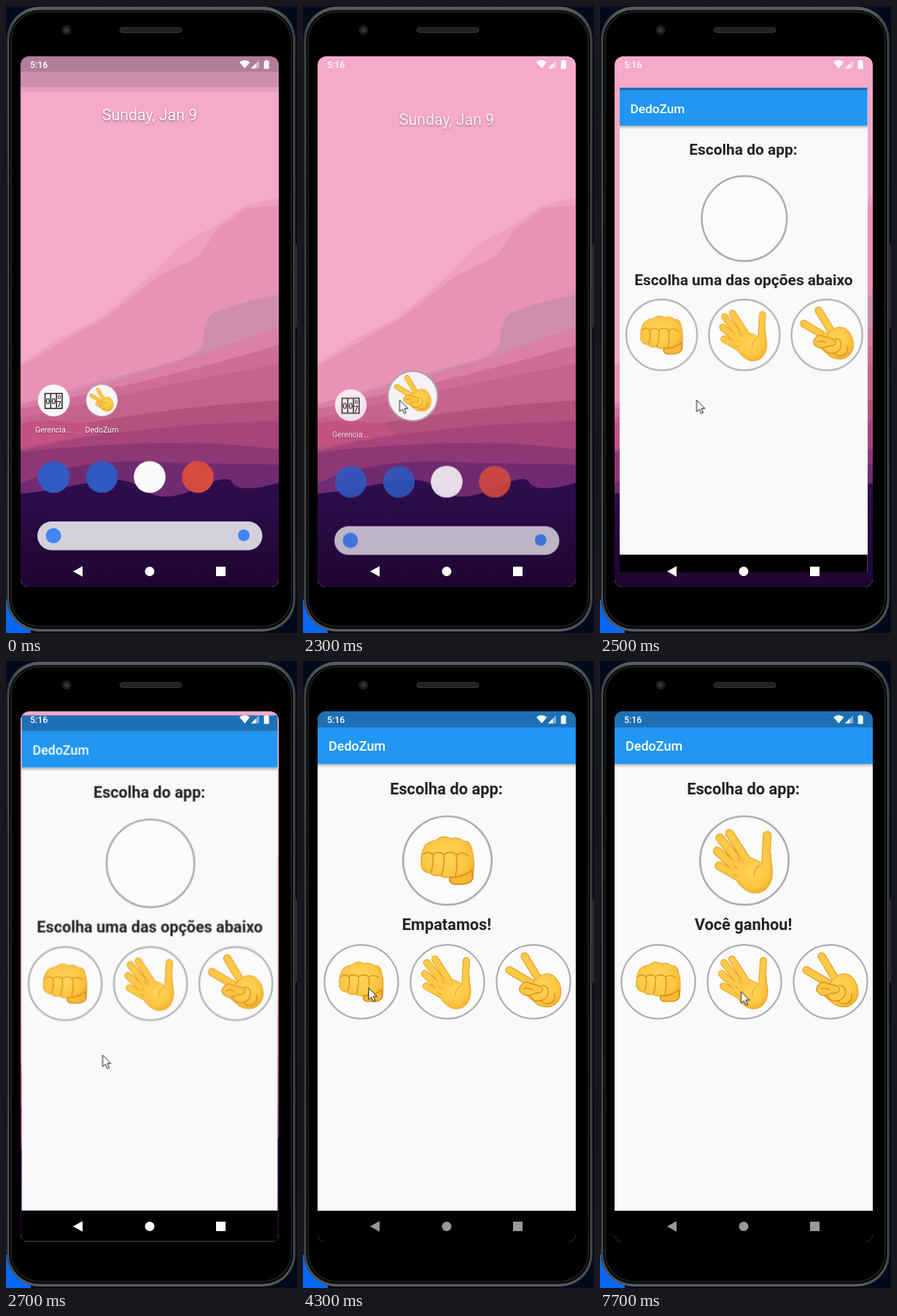
Recreate the animation shown at these times as an HTML page. Size 399x860 px, loop 8000 ms.

```html
<!DOCTYPE html>
<html lang="pt">
<head>
<meta charset="utf-8">
<title>Jogo de mãos</title>
<style>
html, body { margin: 0; width: 100%; height: 100%; overflow: hidden; background: #020a1c; }
svg { position: absolute; display: block; font-family: Roboto, sans-serif; }
.frame { left: 0; top: 0; width: 399px; height: 860px; }
.screen { position: absolute; left: 20px; top: 69px; width: 354px; height: 728px; border-radius: 12px; overflow: hidden; }
.pane { left: 0; top: 0; width: 354px; height: 728px; transform-origin: 0 0; }
.mid { text-anchor: middle; }
.heading { font-size: 21.8px; font-weight: 700; fill: #222; text-anchor: middle; }
.shade { text-shadow: 0 1px 2px rgba(60, 20, 50, .6); }

.icons, .tapped, .scrim, .launch, .app, .ask, .tie, .win, .appRock, .appPaper, .cursor {
  animation: 8s step-end -8ms infinite;
}
.icons { animation-name: icons; }
.scrim, .tapped { animation-name: leave; }
.launch { animation-name: launch; }
.app { animation-name: app; }
.ask { animation-name: ask; }
.tie { animation-name: tie; }
.win { animation-name: win; }
.appRock { animation-name: appRock; }
.appPaper { animation-name: appPaper; }
.cursor { animation-name: cursor; }
.nav { animation: nav 8s linear -8ms infinite; }

@keyframes icons {
  0% { transform: none; opacity: 1; }
  28.75% { transform: translateY(6.5px); opacity: .87; }
  30% { transform: translateY(38px); opacity: .31; }
  31.25%, 100% { transform: translateY(60px); opacity: 0; }
}
@keyframes leave { 0% { opacity: 1; } 28.75%, 100% { opacity: 0; } }
@keyframes launch { 0% { opacity: 0; } 28.75% { opacity: 1; } 30%, 100% { opacity: 0; } }
@keyframes app {
  0% { opacity: 0; transform: none; clip-path: inset(0); }
  30% { opacity: 1; transform: translate(28px, 98.6px) scale(.82); clip-path: inset(88px 0 90px); }
  31.25% { opacity: 1; transform: translate(7px, 26px) scale(.96); clip-path: inset(18px 0 18px); }
  33.75% { opacity: 1; transform: translate(1.6px, 5.6px) scale(.9915); clip-path: inset(0); }
  35%, 100% { opacity: 1; transform: none; clip-path: inset(0); }
}
@keyframes ask { 0% { opacity: 1; } 45%, 100% { opacity: 0; } }
@keyframes tie { 0% { opacity: 0; } 45% { opacity: 1; } 88.75%, 100% { opacity: 0; } }
@keyframes win { 0% { opacity: 0; } 88.75%, 100% { opacity: 1; } }
@keyframes appRock { 0% { opacity: 0; } 45% { opacity: 1; } 76.25%, 100% { opacity: 0; } }
@keyframes appPaper { 0% { opacity: 0; } 76.25%, 100% { opacity: 1; } }
@keyframes nav { 0%, 36% { opacity: 1; } 45% { opacity: .66; } 53.75%, 100% { opacity: .6; } }
@keyframes cursor {
  0% { transform: translate(-40px, -40px); }
  18.75% { transform: translate(26px, 4px); }
  20% { transform: translate(40px, 190px); }
  21.25% { transform: translate(64px, 400px); }
  22.5% { transform: translate(90px, 560px); }
  23.75% { transform: translate(110px, 606px); }
  25% { transform: translate(126px, 570px); }
  26.25% { transform: translate(132.5px, 540.5px); }
  35% { transform: translate(132.5px, 540.5px); animation-timing-function: steps(7, end); }
  43.75% { transform: translate(90px, 448.5px); }
  67.5% { transform: translate(84px, 390px); }
  68.75% { transform: translate(130px, 303px); }
  70% { transform: translate(192px, 466px); }
  71.25% { transform: translate(207.5px, 458px); }
  82.5% { transform: translate(250px, 457px); }
  83.75% { transform: translate(298px, 456px); }
  85% { transform: translate(312.5px, 457px); }
  93.75% { transform: translate(270px, 456px); }
  95% { transform: translate(212px, 454px); }
  96.25%, 100% { transform: translate(193.5px, 453.5px); }
}
</style>
</head>
<body>
<svg class="frame" viewBox="0 0 399 860">
  <defs>
    <linearGradient id="rim" x2="0" y2="1">
      <stop offset="0" stop-color="#5a6062"/><stop offset=".04" stop-color="#33383a"/>
      <stop offset=".5" stop-color="#24282a"/><stop offset=".94" stop-color="#34393b"/><stop offset="1" stop-color="#555b5d"/>
    </linearGradient>
    <radialGradient id="skin" cx=".45" cy=".4" r=".65">
      <stop offset="0" stop-color="#ffd55a"/><stop offset=".65" stop-color="#fdc843"/><stop offset="1" stop-color="#f4ad2c"/>
    </radialGradient>
    <linearGradient id="night" x2="0" y2="1">
      <stop offset="0" stop-color="#300d50"/><stop offset=".5" stop-color="#270a40"/><stop offset="1" stop-color="#1e0630"/>
    </linearGradient>
    <linearGradient id="drop" x2="0" y2="1">
      <stop offset="0" stop-color="#000" stop-opacity=".3"/><stop offset="1" stop-color="#000" stop-opacity="0"/>
    </linearGradient>

    <g id="rock" stroke-linecap="round" stroke-linejoin="round">
      <path d="M-30 6Q-31 -10 -25 -18Q-19 -23 -13 -23Q-5 -30 4 -25Q13 -27 18 -22Q25 -23 27 -16Q31 -4 30 10L29 21Q26 27 17 27H7Q1 25 3 19Q-5 20 -8 17Q-16 19 -20 14Q-28 14 -30 6Z" fill="url(#skin)" stroke="#e59c25"/>
      <path d="M-19 13Q-15 5 -17 -7M-7 17Q-3 6 -4 -7M9 18Q12 6 10 -7M-28 -7Q-23 -12 -17 -7Q-11 -12 -4 -7Q3 -12 10 -7Q18 -11 24 -5" fill="none" stroke="#dc8c1d" stroke-width="1.3"/>
      <path d="M3 19Q17 20 28 11L29 20Q27 27 17 27H7Q1 25 3 19Z" fill="#f9b934" stroke="#d1811a" stroke-width="1.2"/>
    </g>

    <path id="digits" d="M-17 -31L5 3M-28 -26L-2 7M-31 -11L-5 13M-29 6L-3 21M26 -29L24 7"/>
    <g id="paper" fill="none" stroke-linecap="round" stroke-linejoin="round">
      <use href="#digits" stroke="#e59c25" stroke-width="10"/>
      <path d="M-10 17Q-6 2 7 -3Q17 0 20 4Q21 -3 22 -8H30Q30 0 32 10Q33 21 27 30Q21 38 10 37Q2 36 -7 26Z" fill="url(#skin)" stroke="#eaa32a"/>
      <use href="#digits" stroke="#fdc946" stroke-width="8"/>
      <path d="M-5 2L-8 -3M-8 10L-12 6M-8 18L-13 15M18 5Q11 9 11 18" stroke="#e39a25"/>
    </g>

    <path id="vee" d="M-12 -35L8 -2M-33 -16L4 6"/>
    <g id="scissors" fill="none" stroke-linecap="round" stroke-linejoin="round">
      <use href="#vee" stroke="#e0951f" stroke-width="11"/>
      <use href="#vee" stroke="#fdc946" stroke-width="9"/>
      <path d="M1 -1Q14 -16 27 -9Q38 0 38 15Q37 29 24 34Q9 37 -1 26L-8 20Q-10 12 -2 10Z" fill="url(#skin)" stroke="#e59c25"/>
      <path d="M-16 4Q-13 -2 -5 2L10 6Q16 11 9 15L1 16L-7 19Q-15 19 -19 12Q-20 7 -16 4Z" fill="#fdc642" stroke="#d88a1d" stroke-width="1.3"/>
      <path d="M-5 19Q-1 28 10 26Q19 24 20 16Q22 6 12 5M11 26Q14 31 21 30Q31 27 29 16M-13 10Q-7 7 -2 11" stroke="#d88a1d" stroke-width="1.3"/>
    </g>
    <circle id="ring" r="50.6" fill="#fbfbfb" stroke="#adadad" stroke-width="2.2"/>
  </defs>

  <rect width="399" height="860" fill="#020a1c"/>
  <ellipse cx="0" cy="860" rx="34" ry="46" fill="#0868f5"/>
  <rect x="394" y="327" width="5" height="114" rx="2" fill="#2c3033"/>
  <rect x="1" y="1" width="396" height="857" rx="45" fill="url(#rim)"/>
  <rect x="3.5" y="5" width="391" height="850" rx="42" fill="#080909" stroke="#586063" stroke-width="1"/>
  <rect x="7" y="8" width="384" height="843" rx="39" fill="#000" stroke="#202426" stroke-width="1.5"/>
  <circle cx="83" cy="33" r="6.5" fill="#1c1d20"/><circle cx="83" cy="33" r="3" fill="#33363e"/>
  <rect x="156" y="29.5" width="85" height="7" rx="3.5" fill="#222" stroke="#343434"/>
</svg>

<div class="screen">
  <svg class="pane" viewBox="20 69 354 728">
    <rect x="20" y="69" width="354" height="728" fill="#f4aac8"/>
    <path fill="#ef9fc0" d="M20 490L75 455L130 427Q200 372 240 327L290 300L325 275L374 262V797H20Z"/>
    <path fill="#e893b5" d="M20 494L90 453L135 428L210 370L265 343L290 306L330 277L374 273V797H20Z"/>
    <path fill="#d18db0" d="M20 546L130 514L235 486Q270 474 270 459C273 436 274 424 291 418Q325 405 374 396V797H20Z"/>
    <path fill="#da7fa6" d="M20 546L130 520L235 488Q310 464 374 440V797H20Z"/>
    <path fill="#ce6d98" d="M20 553L140 526Q270 496 374 465V797H20Z"/>
    <path fill="#c5638f" d="M20 566Q150 532 374 491V797H20Z"/>
    <path fill="#b4517f" d="M20 590L120 570Q250 548 374 541V797H20Z"/>
    <path fill="#c45285" d="M20 572Q65 565 112 574L128 586L20 606Z"/>
    <path fill="#a74479" d="M20 610Q150 576 374 569V797H20Z"/>
    <path fill="#8e3775" d="M20 612Q90 604 180 600T374 608V797H20Z"/>
    <path fill="#702b70" d="M20 655Q90 622 190 625T374 629V797H20Z"/>
    <path fill="url(#night)" d="M20 669Q45 667 70 662T130 651T190 664T260 662T310 653T350 660L374 654V797H20Z"/>
    <g class="scrim" fill="#71516d">
      <rect x="20" y="69" width="354" height="49" opacity=".12"/>
      <rect x="20" y="69" width="354" height="42" opacity=".22"/>
      <rect x="20" y="69" width="354" height="21" opacity=".28"/>
    </g>
    <g class="icons">
      <text class="mid shade" x="197" y="157" font-size="21.3" fill="#fff">Sunday, Jan 9</text>
      <circle cx="65.5" cy="541" r="21.8" fill="#f8f7f8"/>
      <path d="M53.5 531.5H77V552H53.5ZM61.3 531V552M69.2 531V552" fill="none" stroke="#222" stroke-width="1.5"/>
      <g class="mid" font-size="11" font-weight="500" fill="#222">
        <text x="57.4" y="546">0</text><text x="65.3" y="546">0</text>
        <text x="73" y="549.5">7</text><text x="73" y="539" font-size="8">0</text>
      </g>
      <g class="mid shade" font-size="10.6" fill="#fff">
        <text x="65" y="585">Gerencia...</text>
        <text class="tapped" x="131.5" y="585">DedoZum</text>
      </g>
      <g class="tapped">
        <circle cx="131.5" cy="541" r="21.5" fill="#f8f7f8" stroke="#c9c0c6" stroke-width=".8"/>
        <use href="#scissors" transform="translate(131 541) scale(.43)"/>
      </g>
      <circle cx="65.5" cy="646" r="21.8" fill="#305bc4"/>
      <circle cx="131.5" cy="646" r="21.8" fill="#2f59c0"/>
      <circle cx="197" cy="646" r="21.8" fill="#fafafa"/>
      <circle cx="263" cy="646" r="21.8" fill="#d64b3d"/>
      <rect x="43" y="707" width="308.5" height="39.5" rx="19.7" fill="#d4d0da"/>
      <circle cx="65" cy="726.5" r="10.5" fill="#4285f4"/>
      <circle cx="326" cy="726" r="8" fill="#4285f4"/>
    </g>
    <g class="launch">
      <circle cx="150.5" cy="535" r="34" fill="#f5f2f5" stroke="#aaa2aa" stroke-width="2"/>
      <use href="#scissors" transform="translate(150.5 533) scale(.66)"/>
    </g>
  </svg>

  <svg class="pane app" viewBox="20 69 354 728">
    <rect x="20" y="69" width="354" height="728" fill="#f9f9f9"/>
    <rect x="20" y="141" width="354" height="5" fill="url(#drop)"/>
    <rect x="20" y="69" width="354" height="22" fill="#1d70b6"/>
    <rect x="20" y="91" width="354" height="50" fill="#2196f3"/>
    <rect x="20" y="754" width="354" height="43" fill="#000"/>
    <text x="35" y="123" font-size="18" font-weight="500" fill="#fff">DedoZum</text>
    <text class="heading" x="196.5" y="183">Escolha do app:</text>
    <g transform="translate(198 273.7) scale(1.2)">
      <use href="#ring"/>
      <use class="appRock" href="#rock"/>
      <use class="appPaper" href="#paper"/>
    </g>
    <text class="heading ask" x="197" y="369">Escolha uma das opções abaixo</text>
    <text class="heading tie" x="197" y="369">Empatamos!</text>
    <text class="heading win" x="196.5" y="369">Você ganhou!</text>
    <g transform="translate(80 440)"><use href="#ring"/><use href="#rock"/></g>
    <g transform="translate(198 440)"><use href="#ring"/><use href="#paper"/></g>
    <g transform="translate(316 440)"><use href="#ring"/><use href="#scissors"/></g>
  </svg>

  <svg class="pane" viewBox="20 69 354 728" fill="#fff">
    <text x="33" y="85" font-size="12.4" font-weight="500">5:16</text>
    <path d="M320 77Q327 71.500 334.500 77L327.300 85.500Z"/>
    <path d="M347 74.500V85.500H336Z" opacity=".45"/><path d="M342.500 79V85.500H336Z"/>
    <path d="M355.800 74H358.500V75.200H360.600V86.300H353.700V75.200H355.800Z"/>
    <g class="nav">
      <path d="M92 775.500L105 768.300V782.700Z"/>
      <circle cx="197" cy="775.500" r="6.500"/>
      <rect x="288" y="769" width="13" height="13"/>
    </g>
  </svg>
</div>

<svg class="frame" viewBox="0 0 399 860">
  <path class="cursor" d="M0 0V16L3.700 12.600L6.300 18.500L9 17.300L6.400 11.600H11.400Z" fill="#fff" stroke="#111" stroke-width="1"/>
</svg>
</body>
</html>
```
